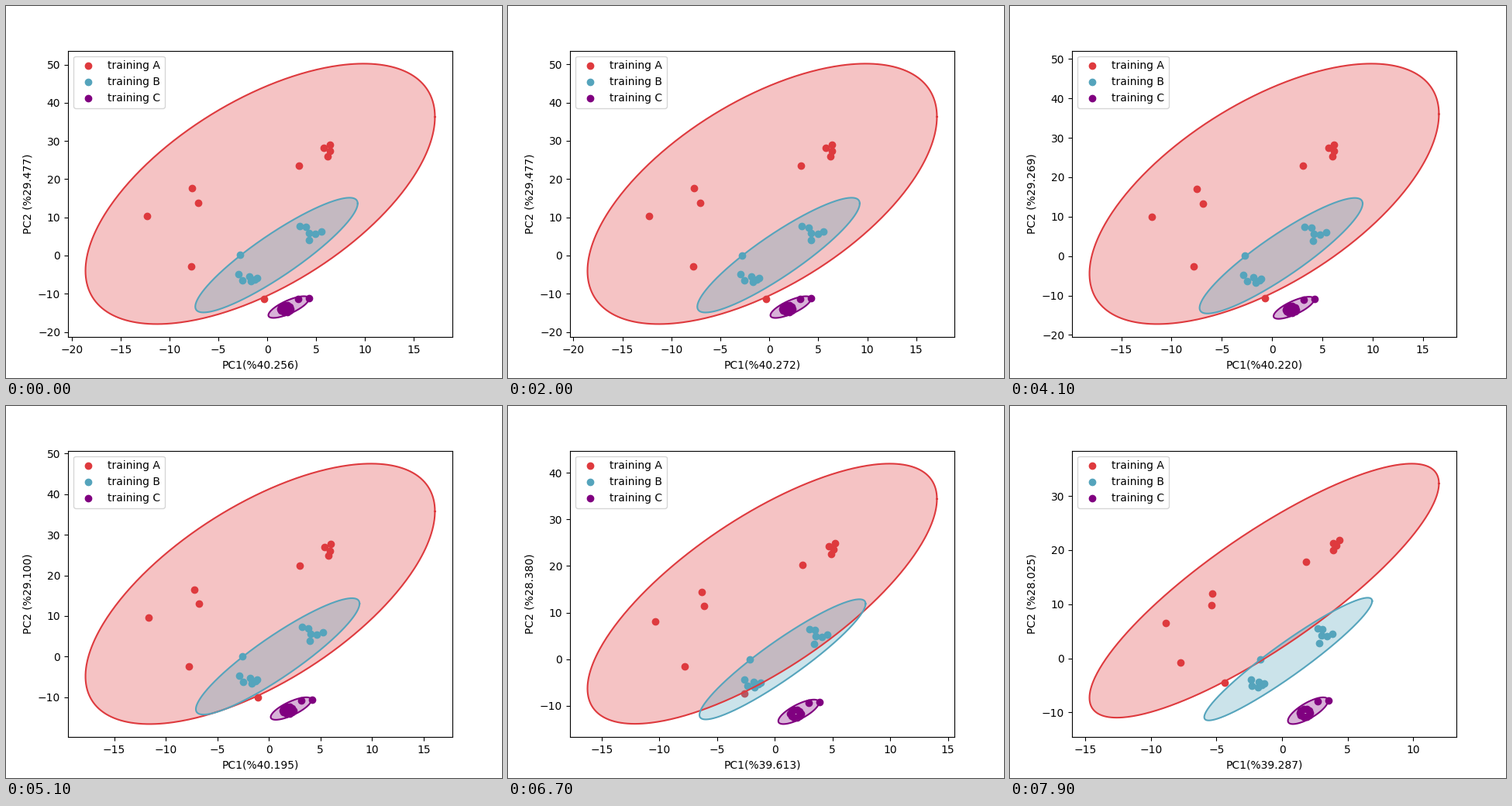
A matplotlib script for the animation above (8 s loop, 640x480 px).

```python
import matplotlib.pyplot as plt
import numpy as np
from matplotlib.animation import FuncAnimation

FRAMES, INTERVAL = 80, 100
RADIUS = np.sqrt(-2 * np.log(0.05))  # 95 % confidence, two dimensions
TURN = np.linspace(0, 2 * np.pi, 401)

# Key moments of the drift, with the share of variance shown on the axes
BEATS = [0, 20, 32, 51, 62, 73, 79]
DRIFT = [0, 0.005, 0.015, 0.19, 0.33, 0.87, 1]
PC1 = [40.256, 40.272, 40.243, 40.195, 39.865, 39.311, 39.287]
PC2 = [29.477, 29.477, 29.422, 29.100, 28.635, 28.073, 28.025]


def oval(center, axes, angles):
    return np.array(center) + np.c_[np.cos(angles), np.sin(angles)] * axes


def confidence(pts):
    root = np.linalg.cholesky(np.cov(pts.T))
    return pts.mean(axis=0) + RADIUS * oval(0, 1, TURN) @ root.T


class Group:
    """Points that drift, by one linear map, towards a new centre."""

    def __init__(self, label, color, pts, matrix, center):
        self.label, self.color = label, color
        self.start = np.array(pts)
        offsets = self.start - self.start.mean(axis=0)
        self.end = offsets @ np.array(matrix).T + center

    def draw(self, ax, p):
        pts = self.start + (self.end - self.start) * p
        edge = confidence(pts)
        ax.scatter(*pts.T, color=self.color, label=self.label)
        ax.fill(*edge.T, color=self.color, alpha=0.3, linewidth=0)
        ax.plot(*edge.T, color=self.color, linewidth=1.5)


GROUPS = [
    Group("training A", "#DE3A3E",
          [(-12.3, 10.35), (-7.7, 17.6), (-7.07, 13.8), (-7.78, -2.85),
           (-0.33, -11.4), (3.23, 23.5), (6.37, 29.0), (6.21, 25.95),
           (5.77, 28.2), (6.37, 27.3)],
          [(0.59, 0.118), (0.204, 0.62)], (-1.36, 12.5)),
    Group("training B", "#55A4BC",
          [(-2.79, 0.1), (-2.95, -4.87), (-2.51, -6.5), (-1.84, -5.5),
           (-1.64, -6.8), (-1.24, -6.2), (-1.05, -5.8), (3.31, 7.7),
           (3.99, 7.4), (4.23, 5.9), (4.23, 4.05), (4.94, 5.7), (5.57, 6.3)],
          [(0.57, 0.12), (0, 0.755)], (0.47, -0.15)),
    Group("training C", "purple",
          [(4.3, -11.26), (3.19, -11.46),
           *oval((1.87, -13.92), (0.53, 0.88), TURN[:-1:40])],
          [(0.74, 0), (0, 0.87)], (1.98, -9.69)),
]

fig, ax = plt.subplots(figsize=(6.4, 4.8), dpi=100)


def draw(frame):
    drift, pc1, pc2 = (np.interp(frame, BEATS, v) for v in (DRIFT, PC1, PC2))
    ax.clear()
    for group in GROUPS:
        group.draw(ax, drift)
    ax.set_xlabel(f"PC1(%{pc1:.3f})")
    ax.set_ylabel(f"PC2 (%{pc2:.3f})")
    ax.legend(loc="upper left")
    return ax.get_children()


anim = FuncAnimation(fig, draw, frames=FRAMES, interval=INTERVAL,
                     repeat=True, repeat_delay=0)
plt.show()
```
